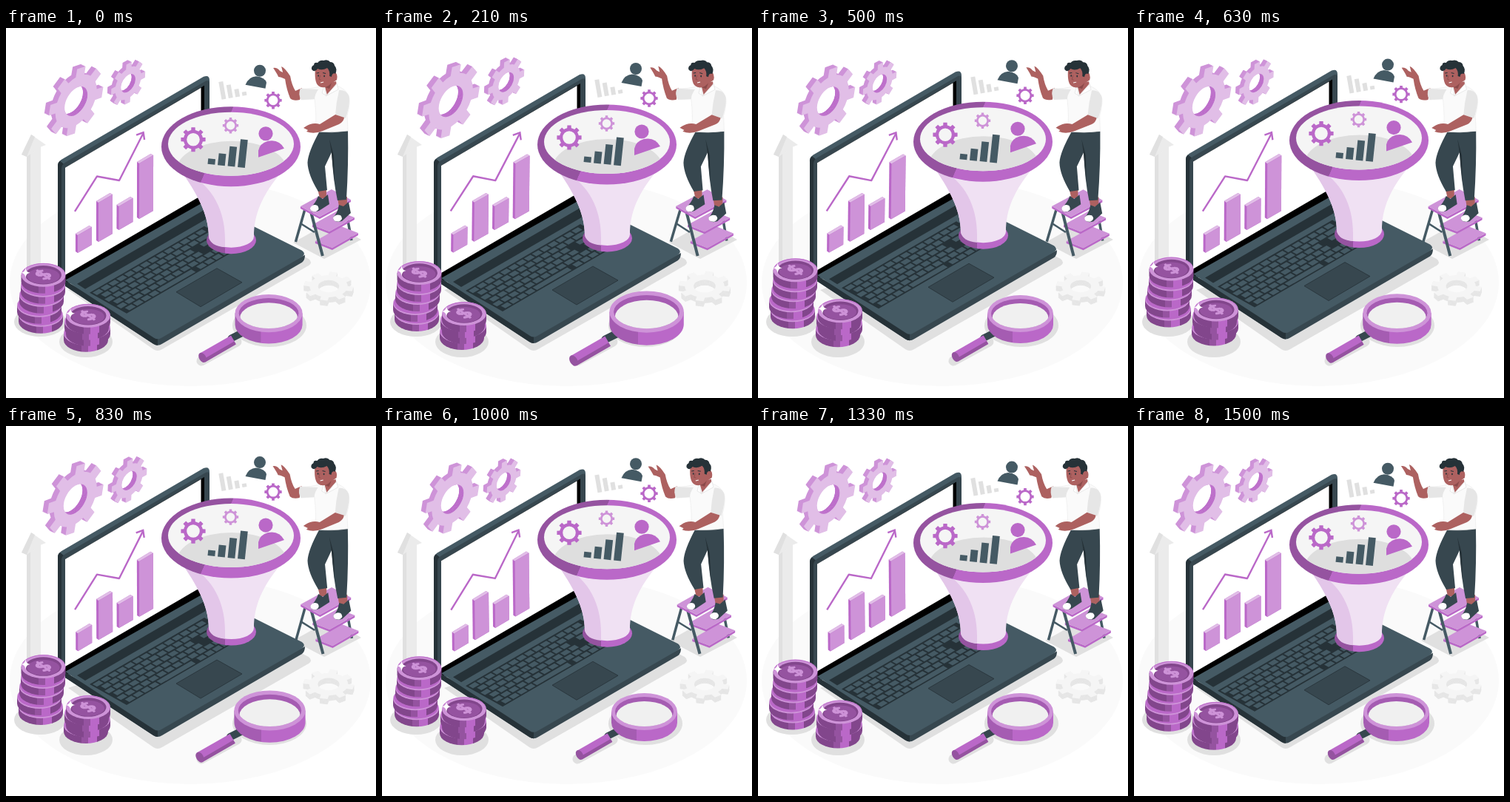
Recreate the animation shown at these times as an HTML page. Size 500 px wide and 500 px high, loop 1540 ms.

```html
<!DOCTYPE html>
<html lang="en">
<head>
<meta charset="utf-8">
<title>Data funnel</title>
<style>
  html, body { margin: 0; width: 100%; height: 100%; overflow: hidden; background: #fff; }
  svg { display: block; width: 100%; height: 100%; }
</style>
</head>
<body>
<svg id="stage" viewBox="0 0 500 500"></svg>
<script>
const C = {
  purple: '#ba68c8', deep: '#9553a0', plum: '#82468c', mid: '#ce93d8', pale: '#e1bee7',
  ink: '#263238', slate: '#37474f', steel: '#455a64',
  skin: '#ad6160', skinDark: '#8a4a4a', grey: '#e0e0e0', light: '#f5f5f5'
};

// Shape helpers
const path = (d, fill, extra = '') => `<path d="${d}" fill="${fill}" ${extra}/>`;
const poly = (pts, fill, extra = '') => `<polygon points="${pts}" fill="${fill}" ${extra}/>`;
const oval = (x, y, rx, ry, fill, extra = '') =>
  `<ellipse cx="${x}" cy="${y}" rx="${rx}" ry="${ry}" fill="${fill}" ${extra}/>`;
const line = (pts, color, width, extra = '') =>
  `<polyline points="${pts}" fill="none" stroke="${color}" stroke-width="${width}" ${extra}/>`;
const group = (id, body) => `<g id="${id}">${body}</g>`;
const at = (transform, body) => `<g transform="${transform}">${body}</g>`;
const range = n => [...Array(n).keys()];
const ovalPath = (x, y, rx, ry) =>
  `M${x - rx} ${y}a${rx} ${ry} 0 0 0 ${2 * rx} 0a${rx} ${ry} 0 0 0 ${-2 * rx} 0z`;
const ringPath = (outer, inner) => ovalPath(0, 0, outer, outer) + ovalPath(0, 0, inner, inner);

// Two-tone fill that switches colour sharply across a line through (x, y)
const split = (id, x, y, nx, ny, a, b) =>
  `<linearGradient id="${id}" gradientUnits="userSpaceOnUse" x1="${x}" y1="${y}" x2="${x + nx}" y2="${y + ny}">
   <stop offset="0" stop-color="${a}"/><stop offset="1" stop-color="${b}"/></linearGradient>`;

function gearPath(R, root, hole, teeth, turn = 0) {
  const p = (r, a) => `${(r * Math.cos(a)).toFixed(2)} ${(r * Math.sin(a)).toFixed(2)}`;
  const step = 2 * Math.PI / teeth;
  const outline = range(teeth).map(i => {
    const a = turn + i * step;
    return `${i ? 'L' : 'M'}${p(root, a - step * .27)}L${p(R, a - step * .2)}L${p(R, a + step * .2)}` +
      `L${p(root, a + step * .27)}A${root} ${root} 0 0 1 ${p(root, a + step * .73)}`;
  }).join('');
  return outline + 'Z' + ovalPath(0, 0, hole, hole);
}
const flatGear = (x, y, R, hole, fill) =>
  at(`translate(${x} ${y})`, path(gearPath(R, R * .78, hole, 8), fill, 'fill-rule="evenodd"'));

// Gear laid on a plane and extruded by (dx, dy)
function solidGear(x, y, R, plane, dx, dy, face, side, wall, turn) {
  const hole = R * .42;
  const gear = gearPath(R, R * .76, hole, 8, turn);
  const layer = (k, d, fill) =>
    at(`translate(${x + dx * k} ${y + dy * k}) matrix(${plane} 0 0)`, path(d, fill, 'fill-rule="evenodd"'));
  return range(8).map(i =>
    layer(1 - i / 8, gear, side) + layer(1 - i / 8, ringPath(hole * 1.2, hole), wall)).join('') +
    layer(0, gear, face);
}

function chartBar(x, top, bottom) {
  const h = bottom - top;
  return path(`M${x} ${top - 2}l18.500-11 3.500 2v${h}l-19 11-3-2z`, C.purple) +
    path(`M${x} ${top - 2}l18.500-11 3.500 2-19 11z`, C.pale) +
    path(`M${x + 3} ${top}l19-11v${h}l-19 11z`, C.mid);
}

const coin = ([x, y]) =>
  path(`M${x - 30} ${y}v9a30 16 0 0 0 60 0v-9z`, 'url(#coinSide)') +
  oval(x, y, 30, 16, C.mid) + oval(x, y - .8, 29, 15, C.purple);

function coinStack(coins) {
  const [x, y] = coins[coins.length - 1];
  return coins.map(coin).join('') +
    oval(x, y, 29, 15, C.mid) + oval(x, y, 24.500, 12.800, C.plum) +
    oval(x, y + 1.500, 22, 10.500, C.deep) +
    at(`matrix(.8 -.46 .8 .46 ${x} ${y})`,
      `<text y="9" text-anchor="middle" font-family="Lato, sans-serif" font-weight="900" font-size="26" fill="${C.mid}" stroke="${C.mid}">$</text>`) +
    at(`translate(${x - 24} ${y - 3})`, path('M0-7Q.6-.6 6 0Q.6 .6 0 7Q-.6 .6-6 0Q-.6-.6 0-7', '#fff'));
}

const defs = `<defs>
  ${split('ringTone', 284, 160, .3, .13, C.deep, C.purple)}
  ${split('spoutTone', 296, 290, .3, 0, C.deep, C.purple)}
  ${split('lensTone', 344, 410, .3, 0, '#a55cb2', C.purple)}
  <linearGradient id="coinSide">
    <stop offset=".4" stop-color="${C.plum}"/><stop offset=".4" stop-color="${C.deep}"/>
    <stop offset=".55" stop-color="${C.deep}"/><stop offset=".55" stop-color="${C.purple}"/>
    <stop offset=".75" stop-color="${C.purple}"/><stop offset=".75" stop-color="${C.plum}"/>
  </linearGradient>
  <clipPath id="mouth">${oval(304, 157, 85, 43, '#fff')}</clipPath>
  <clipPath id="glass">${oval(354.500, 386, 39.500, 20, '#fff')}</clipPath>
</defs>`;

const floor = oval(249, 344, 244, 140, '#fafafa') +
  path('M84 354L199 434Q205 438 211 434L409 321Q415 317 409 312L330 272Z', C.grey) +
  oval(46, 397, 35, 20, C.grey) + oval(108, 424, 36, 21, C.grey) +
  poly('388,290 430,312 480,286 438,262', C.grey) +
  oval(356, 402, 50, 29, C.grey) +
  line('264,450 312,424', C.grey, 13, 'stroke-linecap="round"');

const upArrow = poly('28,165 47,160 47,330 28,330', '#ebebeb') +
  poly('28,165 33,168 33,330 28,330', C.grey) +
  poly('21,171 34,144 54,158 46,161 28,174', '#ebebeb') +
  poly('21,171 34,144 39,147 28,174', C.grey);

const WALL = '.866 -.5 0 1', FLOOR = '1 0 0 .58';
const gears = solidGear(95, 99, 42, WALL, -6, -3, C.pale, C.mid, C.purple, .2) +
  solidGear(164.500, 75, 26.500, WALL, -5, -2.500, C.pale, C.mid, C.purple, .05);
const floorGear = solidGear(436, 349, 33.500, FLOOR, 0, 7, C.light, '#e6e6e6', '#e6e6e6', .2);

function keyboard() {
  let keys = '';
  for (let row = 0; row < 6; row++) {
    for (let col = 0; col < 14; col++) {
      if (col === 11 && (row === 2 || row === 3)) continue;
      if (row === 5 && col > 4 && col < 9) continue;
      const shift = row % 2 ? .3 : 0;
      keys += `<rect x="${col + .12 + shift * (col < 13)}" y="${row + .14}" width=".82" height=".74"/>`;
    }
  }
  keys += '<rect x="5.100" y="5.140" width="3.700" height=".74"/>';
  return poly('113,358 268,268 318,296 163,386', C.ink) +
    at('matrix(10.700 -6.200 8.100 4.500 114.500 358)', `<g fill="${C.steel}">${keys}</g>`);
}

const laptop =
  path('M70 346V186Q70 181 75 178L267 66Q275 63 275 71V240L79 350Z', C.steel) +
  path('M70 346V186Q70 182 73 180L78 184V344Z', C.ink) +
  path('M75 346V190Q75 185 80 182L268 73Q274 69 275 74V240Z', C.slate) +
  poly('80,189 268,78 268,238 80,346', '#000') +
  poly('80,189 263.500,81 263.500,227 80,334', '#fff') +
  path('M80 342V349L199 427Q205 431 211 427L400 317Q404 314 404 307L205 410Z', C.slate) +
  path('M80 342V349L199 427Q202 429 205 429V416Z', C.ink) +
  path('M80 341L268 235L400 301Q406 305.500 400 309.500L210 419Q205 422 200 419Z', C.steel) +
  poly('96,346 268,246 280,253 107,353', C.ink) +
  keyboard() +
  poly('230,357 285,325 319,344 263,377', C.slate, `stroke="${C.ink}" stroke-width=".8"`);

const chart = [[94, 280, 304], [122, 236, 289], [149.500, 241, 273], [177, 183, 258]]
  .map(b => chartBar(...b)).join('') +
  line('93,248 123,200.500 153,206 185.500,142', C.purple, 2.400, 'stroke-linejoin="round"') +
  line('176,144.500 185.500,141 187,151', C.purple, 2.400);

const tallyBars = (w, gap, heights, fill) => heights.map((h, i) =>
  `<rect x="${i * gap}" y="${-h}" width="${w}" height="${h}" fill="${fill}"/>`).join('');

const funnel =
  oval(304.500, 287, 33.500, 18.500, 'url(#spoutTone)') +
  path('M237 194C257 222 274 252 274 282A30.500 15 0 0 0 335 282C335 252 346 226 373 194Z', '#f0e1f3') +
  path('M237 194C257 222 274 252 274 282Q276 295 296 296.500C297 268 293 234 262 207Z', '#e3c6e9') +
  path(ovalPath(304, 160.500, 94, 54), 'url(#ringTone)') +
  oval(304, 157, 85, 43, C.light) +
  `<g clip-path="url(#mouth)">${oval(305, 193, 75, 40, '#dedede')}</g>` +
  flatGear(253, 151, 16.800, 8.800, C.purple) +
  flatGear(303.500, 132, 10.800, 5.800, C.mid) +
  at('translate(272.500 184) rotate(6)', tallyBars(9.800, 13.600, [7.500, 16, 27, 38], C.steel)) +
  oval(351, 143, 9.600, 9.600, C.purple) +
  path('M341 175V166Q343 156 354 153Q369 150 376 163Z', C.purple) +
  at('translate(291.500 97) rotate(-10)', tallyBars(6, 9.500, [24, 18, 10.500, 5], C.grey)) +
  oval(343, 58, 8, 8, C.steel) +
  path('M323.500 77Q328 66 338 65.500Q350 67 352 74L350.500 82Z', C.steel) +
  flatGear(361, 98, 11.800, 6.500, C.purple);

// Tread spanned by (ax, -ay) and (bx, by)
const step = (x, y, ax, ay, bx, by) =>
  path(`M${x} ${y}l${bx} ${by} ${ax} ${-ay}v3l${-ax} ${ay} ${-bx} ${-by}z`, C.purple) +
  path(`M${x} ${y}l${ax} ${-ay} ${bx} ${by} ${-ax} ${ay}z`, C.mid);

const ladder =
  line('458,238 467,287', C.steel, 3.500) +
  step(418, 288, 35, 20, 23, 9) + step(414, 266, 34, 19, 23, 9) +
  line('404,245 391.500,289', C.steel, 3.500) + line('398,264 417,276', C.steel, 2.500) +
  line('412,248 428,308', C.steel, 4) + step(398, 241, 42, 23, 26, 14);

const figure =
  // legs and shoes
  path('M421 217L433 216V230H424ZM448 229L461 228V241H450Z', C.skin) +
  path('M422 227L428 231L435 225L437 238L423 247Q412 251 411 243Q418 238 422 227Z', C.slate) +
  path('M411 243Q415 237 421 240Q425 245 419 248Q411 249 411 243', '#fff') +
  path('M450 239L456 241L463 235L466 250L454 261Q443 264 442 256Q448 251 450 239Z', C.slate) +
  path('M442 256Q446 251 452 253Q457 258 450 261.500Q442 262 442 256', '#fff') +
  path('M424 139H462Q463 185 460 232L448 233Q442 205 440 168L431 187L434 219L422 221Q408 198 407.500 182Q408 168 424 139Z', C.slate) +
  path('M437 150L440 170L444 208L443 172Z', C.ink) +
  // raised arm
  path('M400 81L397 97Q388 99 384 95Q379 83 377 69Q371 66 368 66Q367 63 361 54Q366 53 370 58L374 60L372 52Q377 54 384 65Q386 77 391 85Z', C.skin) +
  // shirt
  path('M427 78Q411 83 398 82Q395 90 399 97L417 96Q420 120 418 140Q441 142 462 139L461 118Q466 99 463 92Q459 82 447 78Z', '#fafafa', `stroke="#ececec" stroke-width=".7"`) +
  path('M450 84Q446 101 445 117L459 122Q466 99 463 91Q459 83 450 84ZM398 82L422 83Q417 90 417 96L399 97Q395 90 398 82Z', '#e6e6e6') +
  path('M430 76L446 72L447 81L434 91Z', C.skin) +
  path('M430 77L432 91L427 88ZM447 75L449 83L432 92Z', '#fff', `stroke="${C.grey}" stroke-width=".7"`) +
  // lowered arm
  path('M445 117L457 121Q456 127 450 130L428 139Q416 144 406 140L408 138L402 135L405 133Q414 127 424 130Z', C.skin) +
  // head
  path('M418 53Q416 73 422 78Q427 82 434 79L447 70Q449 62 443 58L438 50Z', C.skin) +
  path('M431 80Q436 79 440 74L437 82Z', C.skinDark) +
  path('M413 56Q412 52 416 50Q416 46 421 47Q424 43 429 44Q435 42 438 46Q443 46 444 51Q448 55 445 62Q441 60 440 66L437 65Q438 58 434 54Q427 58 421 55Q417 61 413 56Z', C.ink) +
  oval(443.500, 66, 3.300, 4.500, C.skin) +
  line('419.500,61 423,60.500', C.ink, 1) + line('428,60.500 432,61.500', C.ink, 1) +
  oval(422, 64.500, .9, 1.300, C.ink) + oval(430, 65, .9, 1.300, C.ink) +
  line('424.500,64 423,69.500 425.500,70', C.skinDark, .8) +
  line('425,74 429,73', '#fff', 1);

const magnifier =
  line('305,419 323,410', C.slate, 9.500, 'stroke-linecap="round"') +
  line('267,444.500 308,421', C.purple, 13.500) + line('269.500,448.500 310,425', C.deep, 4.500) +
  at('rotate(-30 267 444.500)', oval(267, 444.500, 4.500, 7, C.deep)) +
  path('M310 386V401A44.500 25 0 0 0 399 401V386Z', 'url(#lensTone)') +
  oval(354.500, 386, 44.500, 25, C.mid) +
  `<g clip-path="url(#glass)">${oval(354.500, 386, 40, 20.500, '#a55cb2')}${oval(354.500, 392, 38, 20, '#f0f0f0')}</g>`;

const bigStack = [[47, 388], [45, 375], [48, 361], [50, 348], [50.500, 334]];
const smallStack = [[108, 413], [111, 405], [109, 397], [111, 389]];

stage.innerHTML = defs + floor + upArrow +
  group('gears', gears) + group('laptop', laptop) + group('chart', chart) +
  group('funnel', funnel) + group('coins', coinStack(bigStack) + coinStack(smallStack)) +
  group('worker', ladder + figure) + group('floorGear', floorGear) + group('magnifier', magnifier);

// Motion: piecewise linear keys over one loop
const LOOP = 1540, LEAD = 20;
const FLOAT = [[0, 0], [.5, -10], [1, 0]];
const SWAY = [[0, 0], [.25, 1], [.75, -1], [1, 0]];
const BEAT = [[0, 0], [.1, 1], [.3, 0], [.4, 0], [.5, 1], [.6, 0], [1, 0]];

function sample(keys, u) {
  const i = keys.findIndex(k => k[0] > u);
  const [a, from] = keys[i - 1], [b, to] = keys[i];
  return from + (to - from) * (u - a) / (b - a);
}
const move = (id, transform) => document.getElementById(id).setAttribute('transform', transform);
const zoom = (id, x, y, s) => move(id, `translate(${x} ${y}) scale(${s}) translate(${-x} ${-y})`);

const start = performance.now();
function draw() {
  const u = (performance.now() - start + LEAD) % LOOP / LOOP;
  const lift = sample(FLOAT, u), sway = sample(SWAY, u), beat = sample(BEAT, u);
  for (const id of ['laptop', 'funnel', 'coins']) move(id, `translate(0 ${lift})`);
  move('chart', `rotate(${sway} 146 223)`);
  move('worker', `rotate(${sway} 419 176)`);
  zoom('gears', 121, 98, 1 + .1 * beat);
  zoom('floorGear', 436, 352, 1 + .07 * beat);
  zoom('magnifier', 330, 405, 1 + .17 * beat);
  requestAnimationFrame(draw);
}
draw();
</script>
</body>
</html>
```
